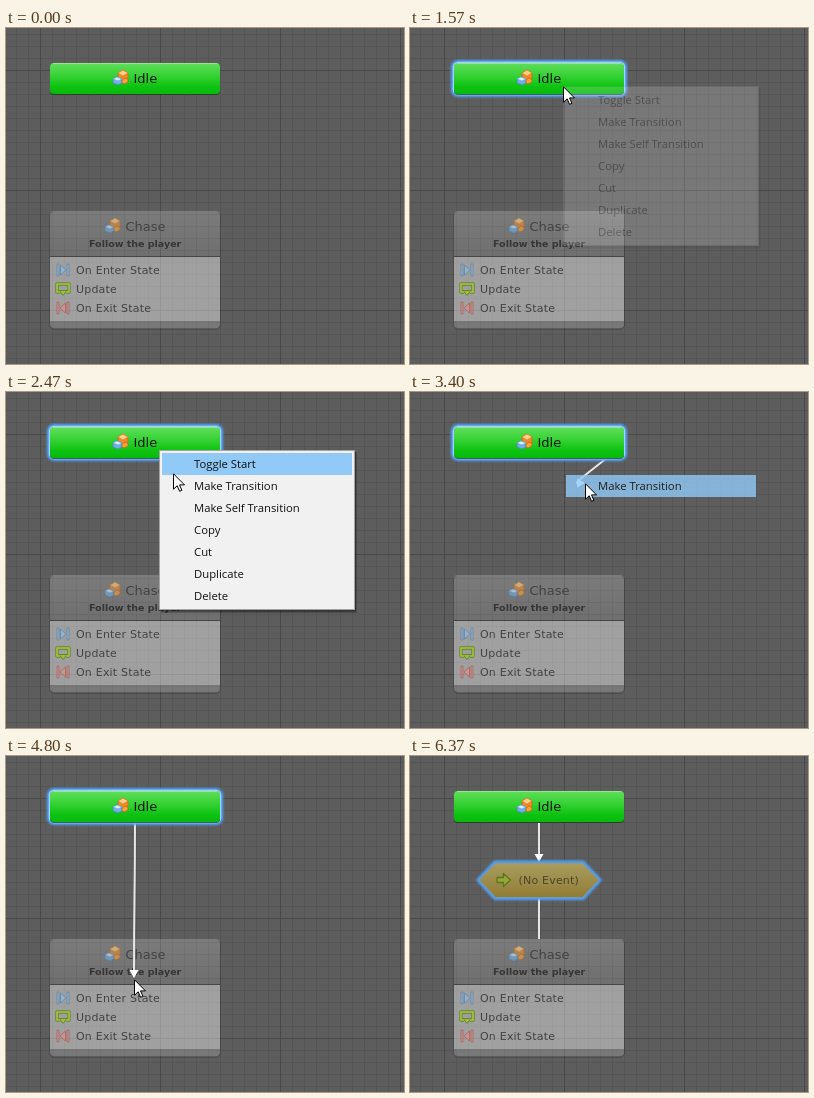
Write an HTML page that moves like this. It is 398 px wide and 336 px high and loops after 7630 ms.

```html
<!DOCTYPE html>
<html lang="en">
<head>
<meta charset="utf-8">
<title>Make Transition</title>
<style>
html, body { margin: 0; width: 100%; height: 100%; overflow: hidden; background: #5d5d5d; }
svg { display: block; width: 398px; height: 336px; }
text { font: 11px "DejaVu Sans", sans-serif; letter-spacing: .2px; white-space: pre; }
.title { font-size: 13px; letter-spacing: 0; }
.sub { font-size: 9.5px; font-weight: bold; letter-spacing: 0; }
#menu text, #flash text { font: 11.3px "Open Sans", sans-serif; letter-spacing: 0; fill: #111; }
.wire { fill: none; stroke: #e6e6e6; stroke-width: 2; }
.glow { fill: none; stroke: #4da3ff; }
</style>
</head>
<body>
<svg viewBox="0 0 398 336">
  <defs>
    <pattern id="minor" x="34" y="42" width="12" height="12" patternUnits="userSpaceOnUse">
      <path d="M0 0H12V1H1V12H0Z" fill="#000" fill-opacity=".09"/>
    </pattern>
    <pattern id="major" x="34" y="42" width="120" height="120" patternUnits="userSpaceOnUse">
      <path d="M0 0H120V1H1V120H0Z" fill="#000" fill-opacity=".14"/>
    </pattern>
    <linearGradient id="green" x2="0" y2="1">
      <stop stop-color="#62df5c"/><stop offset=".5" stop-color="#2bce2b"/><stop offset=".75" stop-color="#0fc312"/><stop offset="1" stop-color="#08b90c"/>
    </linearGradient>
    <linearGradient id="gold" x2="0" y2="1">
      <stop stop-color="#a89d60"/><stop offset="1" stop-color="#927c34"/>
    </linearGradient>
    <linearGradient id="head" x2="0" y2="1">
      <stop stop-color="#fff" stop-opacity=".19"/><stop offset="1" stop-color="#fff" stop-opacity=".11"/>
    </linearGradient>
    <filter id="blur" x="-10%" y="-30%" width="120%" height="160%"><feGaussianBlur stdDeviation="1.3"/></filter>
    <clipPath id="card"><rect x="44" y="183" width="170" height="117" rx="4"/></clipPath>
    <g id="blocks" stroke-width=".7" stroke-linejoin="round">
      <path d="M5 3 10 0 15 3V9L10 12 5 9Z" fill="#f08a24" stroke="#b9651a"/>
      <path d="M5 3 10 0 15 3 10 6Z" fill="#ffd08a" stroke="#d8842c"/>
      <path d="M0 9 4 7 9 9V13L5 15 0 13Z" fill="#6fb0e8" stroke="#4784bd"/>
      <path d="M0 9 4 7 9 9 5 11Z" fill="#d9efff" stroke="#6fa8d8"/>
      <path d="M9 10 12 8 15 9.5V12L11 14 9 13Z" fill="#f5a33c" stroke="#b9651a"/>
    </g>
    <path id="step" d="M.5 .5H2.5V12.500H.5ZM4 1.500 9.500 6.500 4 11.500ZM10.500 .5H12.500V12.500H10.500Z"/>
  </defs>

  <rect width="398" height="336" fill="#5d5d5d"/>
  <rect width="398" height="336" fill="url(#minor)"/>
  <rect width="398" height="336" fill="url(#major)"/>

  <g id="chase">
    <rect x="43.500" y="183.500" width="171" height="118" rx="5" fill="none" stroke="#000" stroke-opacity=".17"/>
    <g clip-path="url(#card)">
      <rect x="44" y="183" width="170" height="45" fill="url(#head)"/>
      <rect x="44" y="183" width="170" height="1" fill="#fff" fill-opacity=".08"/>
      <rect x="44" y="228" width="170" height="1" fill="#000" fill-opacity=".25"/>
      <rect x="44" y="229" width="170" height="64" fill="#fff" fill-opacity=".41"/>
      <rect x="44" y="293" width="170" height="7" fill="#fff" fill-opacity=".17"/>
    </g>
    <use href="#blocks" x="99" y="190" opacity=".6"/>
    <g fill="#434343">
      <text class="title" x="119.500" y="203">Chase</text>
      <text class="sub" x="83" y="219" fill="#353535">Follow the player</text>
      <text x="70" y="246">On Enter State</text>
      <text x="70" y="265">Update</text>
      <text x="70" y="284">On Exit State</text>
    </g>
    <g stroke-width=".8" opacity=".75">
      <use href="#step" x="50.500" y="235.500" fill="#8fb9dc" stroke="#4d7fa8"/>
      <use href="#step" transform="translate(63.500 273.500) scale(-1 1)" fill="#dc8f88" stroke="#a8524d"/>
    </g>
    <path d="M54 264H51V256H63V264H60" fill="none" stroke="#68862a" stroke-width="3.400" stroke-linejoin="round"/>
    <path d="M53 262.500H61L57 267.500Z" fill="#9cbc3e" stroke="#68862a"/>
    <path d="M54 264H51V256H63V264H60" fill="none" stroke="#a5c448" stroke-width="1.600"/>
  </g>

  <g id="drag">
    <path id="curve" class="wire"/>
    <path id="head-arrow" d="M0 0-8-4.500V4.500Z" fill="#fff"/>
  </g>
  <g id="link">
    <path class="wire" d="M129 67V99M129 142V183"/>
    <path d="M124.500 98H133.500L129 106Z" fill="#fff"/>
  </g>

  <g id="idle">
    <g id="idleGlow" class="glow">
      <rect x="43" y="34" width="172" height="33" rx="5" stroke-width="4" filter="url(#blur)"/>
      <rect x="43.500" y="34.500" width="171" height="32" rx="4.500" stroke="#9fd0ff" stroke-width="1.500"/>
    </g>
    <rect x="44" y="36" width="170" height="31" rx="4" fill="#1c3a1c" fill-opacity=".75"/>
    <rect x="44" y="35" width="170" height="31" rx="4" fill="url(#green)"/>
    <path d="M47 35.500H211" stroke="#a5efa0" stroke-opacity=".7"/>
    <use href="#blocks" x="107" y="42"/>
    <text class="title" x="127.500" y="55" fill="#061406">Idle</text>
  </g>

  <g id="event">
    <path class="glow" d="M68.500 124 85 106.500H173L189.500 124 173 142H85Z" stroke-width="4" stroke-linejoin="round" filter="url(#blur)"/>
    <path d="M69 124 85.500 107H172.500L189 124 172.500 141.500H85.500Z" fill="url(#gold)" stroke="#719bb5" stroke-linejoin="round"/>
    <path d="M87 121.500H93.500V117.500L100.500 124 93.500 130.500V126.500H87Z" fill="#93a832" stroke="#5f7420" stroke-width="1.300" stroke-linejoin="round"/>
    <text x="108.500" y="128" fill="#4d4628">(No Event)</text>
  </g>

  <g id="menu">
    <rect x="155" y="60" width="196" height="161" fill="#000" fill-opacity=".22"/>
    <rect x="155" y="60" width="195" height="159.500" fill="#000" fill-opacity=".3"/>
    <rect x="153.500" y="58.500" width="195" height="159" fill="#f1f1f1" stroke="#a5a5a5"/>
    <rect id="hover" x="156" width="190" height="22" fill="#91c9f7"/>
  </g>
  <g id="flash">
    <rect x="156" y="83" width="190" height="22" fill="#91c9f7"/>
    <text x="188" y="98">Make Transition</text>
  </g>

  <path id="cursor" d="M.5 .8V16.200L4.200 12.800 6.600 18.300 8.900 17.300 6.500 11.900H11.500Z" fill="#fff" stroke="#000" stroke-linejoin="round"/>
</svg>

<script>
const LOOP = 7630, STEP = 100 / 3;
const $ = id => document.getElementById(id);

const items = ['Toggle Start', 'Make Transition', 'Make Self Transition', 'Copy', 'Cut', 'Duplicate', 'Delete'];
items.forEach((label, i) => {
  const text = document.createElementNS('http://www.w3.org/2000/svg', 'text');
  text.setAttribute('x', 188);
  text.setAttribute('y', 76 + 22 * i);
  text.textContent = label;
  $('menu').append(text);
});

// Pointer stops: time, x, y
const stops = [
  [300, 388, 280], [1030, 155, 67], [1200, 153, 58],
  [2140, 153, 58], [2467, 167, 81], [2700, 175, 91],
  [3560, 175, 91], [3867, 160, 117], [4133, 138, 153], [4800, 128, 223],
  [5570, 128, 224], [6333, 65, 332], [6367, 62, 338]
];

const slope = (i, axis) => (stops[i + 1][axis] - stops[i][axis]) / (stops[i + 1][0] - stops[i][0]);

// Harmonic mean of neighbouring slopes keeps the path free of overshoot
function tangent(i, axis) {
  if (i === 0) return slope(0, axis);
  if (i === stops.length - 1) return slope(i - 1, axis);
  const a = slope(i - 1, axis), b = slope(i, axis);
  return a * b > 0 ? 2 * a * b / (a + b) : 0;
}

function pointer(t, axis) {
  let i = 0;
  while (i < stops.length - 2 && t >= stops[i + 1][0]) i++;
  const [a, b] = [stops[i], stops[i + 1]];
  const span = b[0] - a[0], p = clamp((t - a[0]) / span), q = 1 - p;
  return Math.round(
    a[axis] * (1 + 2 * p) * q * q + b[axis] * (3 - 2 * p) * p * p +
    span * p * q * (q * tangent(i, axis) - p * tangent(i + 1, axis)));
}

const clamp = v => Math.min(1, Math.max(0, v));
const show = (id, alpha) => { $(id).style.display = alpha > 0 ? '' : 'none'; $(id).style.opacity = +alpha; };

// Leaves the node sideways or downwards, whichever way the pointer lies
function drawWire(x, y) {
  let d, turn;
  if (Math.abs(x - 129) > y - 51) {
    const end = x - 8, pull = Math.max(4, (end - 214) / 2);
    d = `M214 51C${214 + pull} 51 ${end - pull} ${y} ${end} ${y}`;
    turn = 0;
  } else {
    y -= 1;
    const end = y - 7, pull = Math.max(4, (end - 67) / 2);
    d = `M129 67C129 ${67 + pull} ${x} ${end - pull} ${x} ${end}`;
    turn = 90;
  }
  $('curve').setAttribute('d', d);
  $('head-arrow').setAttribute('transform', `translate(${x} ${y}) rotate(${turn})`);
}

function render(t) {
  const x = pointer(t, 1), y = pointer(t, 2);
  const dragging = t >= 3395 && t < 5160;
  const linked = t >= 5160;
  const row = Math.floor((y - 61) / 22);

  show('cursor', t >= 295 && t < 6360);
  $('cursor').setAttribute('transform', `translate(${x} ${y})`);
  show('idleGlow', t >= 1395 && !linked);
  show('menu', t < 3395 ? clamp((t - 1530) / 200) : 0);
  show('hover', row >= 0);
  $('hover').setAttribute('y', 61 + 22 * Math.max(0, row));
  show('flash', dragging ? clamp((3640 - t) / 300) : 0);
  show('drag', dragging);
  show('link', linked);
  show('event', linked);
  if (dragging) drawWire(x, y);
}

const start = performance.now();
function tick() {
  const t = (performance.now() - start) % LOOP;
  render(Math.floor((t + 4) / STEP) * STEP);
  requestAnimationFrame(tick);
}
tick();
</script>
</body>
</html>
```
